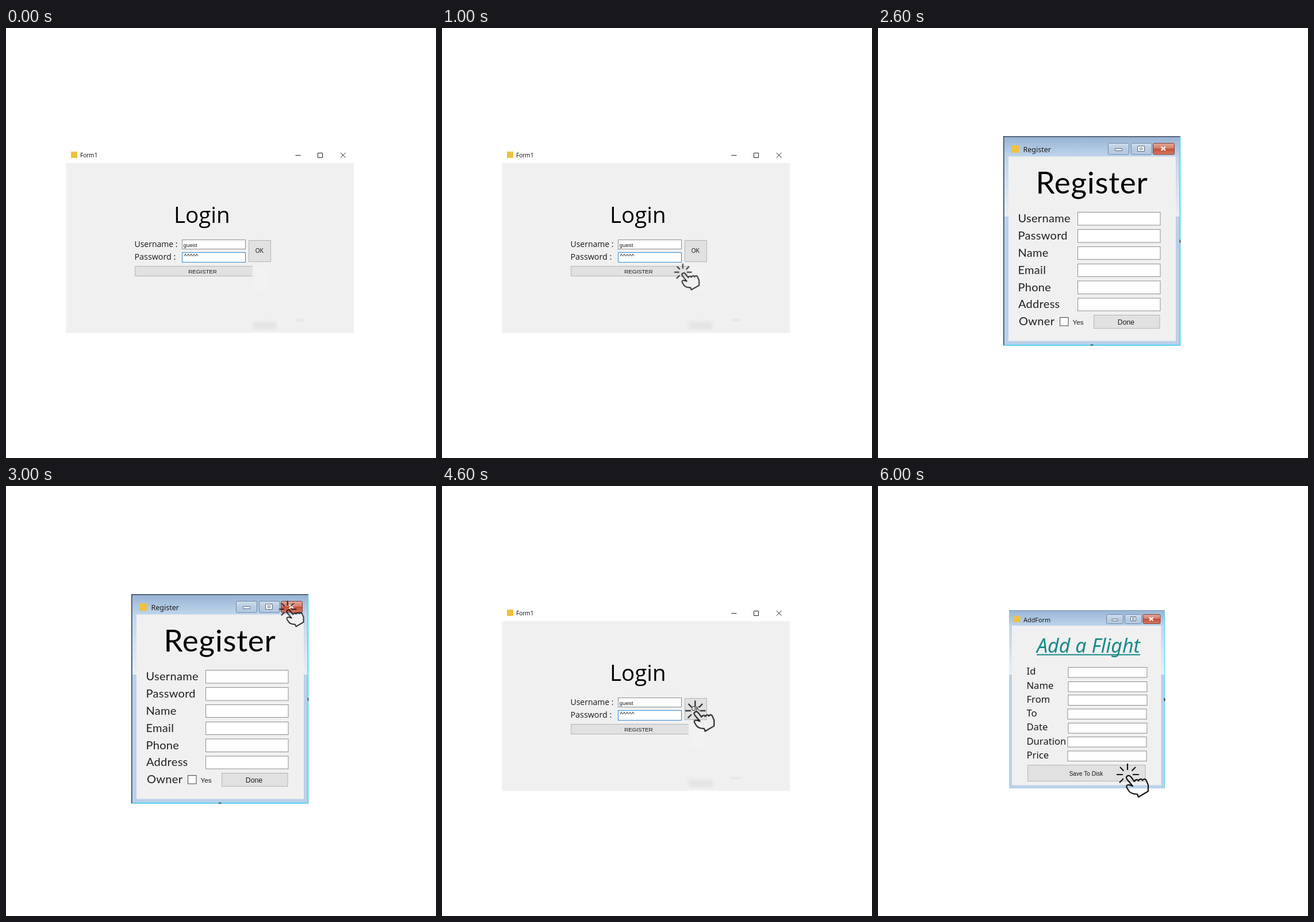
An HTML page that plays this animation: 748 by 748 pixels, repeating every 7000 ms.

```html
<!DOCTYPE html>
<html lang="en">
<head>
<meta charset="utf-8">
<title>Login flow</title>
<style>
html, body { margin: 0; width: 100%; height: 100%; overflow: hidden; background: #fff; }
svg { display: block; width: 100vw; height: 100vh; }

.client { fill: #f0f0f0; }
.field { fill: #fff; stroke: #8a8d91; }
.focus { fill: #fff; stroke: #2f8ad8; }
.btn { fill: #e1e1e1; stroke: #b4b4b4; }
.icon { fill: #f0c040; }
.ctrl { fill: none; stroke: #222; }
.glyph { fill: #fff; stroke: #5b6b80; }
.mid { text-anchor: middle; }
.ui { font-family: "Liberation Sans", Arial, sans-serif; fill: #1a1a1a; }
.noto { font-family: "Noto Sans", sans-serif; fill: #1a1a1a; }
.open { font-family: "Open Sans", sans-serif; fill: #1a1a1a; }
.lato { font-family: Lato, sans-serif; fill: #222; letter-spacing: .015em; }
.title { fill: #000; }

.scene, #hand { visibility: hidden; animation: 7s step-end infinite; }
#login { animation-name: login; }
#register { animation-name: register; }
#list { animation-name: list; }
#add { animation-name: add; }
#hand { animation-name: click; fill: none; stroke: #151313; stroke-width: 2.2; stroke-linejoin: round; }

@keyframes login {
  0% { visibility: visible; }
  28.5714% { visibility: hidden; }
  57.1428% { visibility: visible; }
  71.4285%, 100% { visibility: hidden; }
}
@keyframes register {
  0% { visibility: hidden; }
  28.5714% { visibility: visible; }
  57.1428%, 100% { visibility: hidden; }
}
@keyframes list {
  0% { visibility: hidden; }
  71.4285% { visibility: visible; }
  85.7142%, 100% { visibility: hidden; }
}
@keyframes add {
  0% { visibility: hidden; }
  85.7142%, 100% { visibility: visible; }
}
@keyframes click {
  0% { visibility: hidden; }
  14.2857% { visibility: visible; transform: translate(404px, 410px) scale(.785); }
  28.5714% { visibility: hidden; }
  42.8571% { visibility: visible; transform: translate(475px, 199.5px) scale(.775); }
  57.1428% { visibility: visible; transform: translate(423px, 373.5px) scale(.915); }
  71.4285% { visibility: visible; transform: translate(487px, 526px) scale(.785); }
  85.7142%, 100% { visibility: visible; transform: translate(415px, 483px); }
}
</style>
</head>
<body>
<svg viewBox="0 0 748 748">
  <defs>
    <linearGradient id="bar" x2="0" y2="1">
      <stop offset="0" stop-color="#98b4d4"/><stop offset="1" stop-color="#bfd5ec"/>
    </linearGradient>
    <linearGradient id="side" x2="0" y2="1">
      <stop offset="0" stop-color="#bfd5ec"/><stop offset="1" stop-color="#e6eff8"/>
    </linearGradient>
    <linearGradient id="pane" x2="0" y2="1">
      <stop offset="0" stop-color="#cfdeee"/><stop offset=".5" stop-color="#b9cce1"/><stop offset="1" stop-color="#b3cae3"/>
    </linearGradient>
    <linearGradient id="red" x2="0" y2="1">
      <stop offset="0" stop-color="#e3a999"/><stop offset=".48" stop-color="#d47a66"/>
      <stop offset=".5" stop-color="#c44e37"/><stop offset="1" stop-color="#d67a60"/>
    </linearGradient>
    <filter id="soft" x="-50%" y="-50%" width="200%" height="200%"><feGaussianBlur stdDeviation="3"/></filter>
  </defs>

  <g id="login" class="scene">
    <rect class="icon" x="113" y="215" width="11" height="11"/>
    <text class="noto" x="129" y="225" font-size="10">Form1</text>
    <path class="ctrl" d="M503.5 221.5h9M542.5 217.5h8v8h-8zM582 217l8.5 8.5M590.5 217l-8.5 8.5"/>
    <rect class="client" x="104.5" y="235" width="500.5" height="295.5"/>
    <text class="open title" x="292" y="339" font-size="38.5">Login</text>
    <text class="open" x="223.5" y="381" font-size="14">Username :</text>
    <text class="open" x="223.5" y="403" font-size="14.3">Password :</text>
    <rect class="field" x="306.5" y="368.5" width="110" height="16"/>
    <rect class="focus" x="306.5" y="390.5" width="110" height="17"/>
    <text class="ui" x="308.5" y="380.5" font-size="9.8">guest</text>
    <text class="ui" x="309.5" y="400.5" font-size="10.6">^^^^^</text>
    <rect class="btn" x="422.5" y="369.5" width="38" height="37"/>
    <text class="ui mid" x="441" y="391" font-size="10">OK</text>
    <path class="btn" d="M429 414.5h-204.5v17h204.5"/>
    <text class="ui mid" x="342" y="426.5" font-size="9.7">REGISTER</text>
    <g filter="url(#soft)">
      <rect x="431" y="415" width="26" height="42" fill="#f2f2f2"/>
      <rect x="429" y="511" width="42" height="13" fill="#e4e4e4"/>
      <rect x="426" y="531" width="52" height="3" fill="#fff"/>
    </g>
    <rect x="502" y="505.5" width="18" height="5" rx="2.5" fill="#e8e8e8"/>
  </g>

  <g id="register" class="scene">
    <rect x="218" y="188" width="308" height="364.5" fill="#b9d1ea"/>
    <rect x="220" y="190" width="305" height="34" fill="url(#bar)"/>
    <rect x="220" y="223" width="305" height="105" fill="url(#side)"/>
    <path d="M218 189h308M218.7 188v364" fill="none" stroke="#39424e" stroke-width="1.6"/>
    <path d="M525.3 191v360.7H220" fill="none" stroke="#58d3f1" stroke-width="2"/>
    <path d="M524.5 368.5h2v5h-2zM369.5 550.5h5v2h-5z" fill="#555"/>
    <rect class="icon" x="232" y="204" width="13" height="13"/>
    <text class="noto" x="252.5" y="216" font-size="12.5">Register</text>
    <g fill="url(#pane)" stroke="#7188a4">
      <rect x="400.5" y="200.5" width="36" height="19.5" rx="2"/>
      <rect x="440.5" y="200.5" width="35.5" height="19.5" rx="2"/>
      <rect x="478.5" y="200.5" width="37" height="19.5" rx="2" fill="url(#red)" stroke="#84403a"/>
    </g>
    <path class="glyph" d="M412.5 209.5h12v4h-12zM451.5 205.5h12v9h-12zM455.5 208.5h4v3h-4z"/>
    <path d="M492.5 206.5l7.5 6.5M500 206.5l-7.5 6.5" stroke="#fff" stroke-width="2.2"/>
    <rect class="client" x="227" y="223.5" width="291" height="321"/>
    <text class="lato title" x="274.5" y="288" font-size="53">Register</text>
    <g class="lato" font-size="20">
      <text x="243.5" y="338">Username</text>
      <text x="243.5" y="368">Password</text>
      <text x="243.5" y="398">Name</text>
      <text x="243.5" y="428">Email</text>
      <text x="243.5" y="457.5">Phone</text>
      <text x="244" y="487">Address</text>
      <text x="245" y="517">Owner</text>
    </g>
    <g class="field">
      <rect x="347.5" y="320.5" width="143.5" height="22.5"/>
      <rect x="347.5" y="350.5" width="143.5" height="22.5"/>
      <rect x="347.5" y="380.5" width="143.5" height="22"/>
      <rect x="347.5" y="410.5" width="143.5" height="22"/>
      <rect x="347.5" y="440" width="143.5" height="22.5"/>
      <rect x="347.5" y="470" width="143.5" height="22"/>
      <rect x="316.5" y="503.5" width="14.5" height="14.5" stroke="#444"/>
    </g>
    <text class="ui" x="338.5" y="515.5" font-size="11.7">Yes</text>
    <rect class="btn" x="375.5" y="499.5" width="114.5" height="23"/>
    <text class="ui mid" x="431.5" y="515.5" font-size="12.3">Done</text>
  </g>

  <g id="list" class="scene">
    <rect class="client" x="241" y="195" width="268" height="355.5"/>
    <rect class="field" x="244.5" y="221.5" width="262.5" height="299.5"/>
    <g class="btn">
      <rect x="245.5" y="199.5" width="261" height="17.5"/>
      <rect x="245.5" y="528" width="123.5" height="17.5"/>
      <rect x="376" y="528" width="62" height="17.5"/>
      <rect x="444.5" y="528" width="62" height="17.5"/>
    </g>
    <g class="ui" font-size="9">
      <text class="mid" x="375.5" y="212">Refresh</text>
      <text x="246.5" y="232">listBox1</text>
      <text class="mid" x="306.5" y="540">Reserve Seat</text>
      <text class="mid" x="406" y="540" font-size="8.7">Edit Flight</text>
      <text class="mid" x="475" y="540" font-size="8.7">Add Flight</text>
    </g>
  </g>

  <g id="add" class="scene">
    <rect x="228" y="216" width="271" height="310" fill="#b9d1ea"/>
    <rect x="228" y="216" width="271" height="28" fill="url(#bar)"/>
    <rect x="228" y="243" width="271" height="85" fill="url(#side)"/>
    <path d="M228 216.5h271" stroke="#7d94ae"/>
    <path d="M498.5 218v307.5" stroke="#58d3f1"/>
    <path d="M497.5 369h2v5h-2z" fill="#333"/>
    <rect class="icon" x="236.5" y="226" width="11" height="11"/>
    <text class="noto" x="253" y="236.5" font-size="10.9">AddForm</text>
    <g fill="url(#pane)" stroke="#7188a4">
      <rect x="397.5" y="223.5" width="29" height="16" rx="2"/>
      <rect x="429.5" y="223.5" width="29" height="16" rx="2"/>
      <rect x="461" y="223.5" width="30" height="16" rx="2" fill="url(#red)" stroke="#84403a"/>
    </g>
    <path class="glyph" d="M407 231.5h10v3h-10zM439.5 227.5h9v7h-9zM442.5 229.5h3v3h-3z"/>
    <path d="M472 228.5l6.5 5.5M478.5 228.5l-6.500 5.5" stroke="#fff" stroke-width="2"/>
    <rect class="client" x="233" y="243" width="259.5" height="277.5"/>
    <text class="noto" x="276" y="290" font-size="34" font-style="italic" style="fill:#168a88">Add a Flight</text>
    <path d="M276 293.5h180" stroke="#168a88" stroke-width="1.8"/>
    <g class="noto" font-size="16.6">
      <text x="258.5" y="328">Id</text>
      <text x="258.5" y="353">Name</text>
      <text x="258.5" y="376.5">From</text>
      <text x="258.5" y="401">To</text>
      <text x="258.5" y="425">Date</text>
      <text x="258.5" y="449.5">Duration</text>
      <text x="258.5" y="473.5">Price</text>
    </g>
    <g class="field">
      <rect x="331" y="315.5" width="137" height="17.5"/>
      <rect x="331" y="340.5" width="137" height="17.5"/>
      <rect x="331" y="363.5" width="137" height="18"/>
      <rect x="330" y="388" width="137" height="17.5"/>
      <rect x="331" y="412.5" width="137" height="17.5"/>
      <rect x="330" y="436.5" width="137" height="17.5"/>
      <rect x="330" y="461" width="137" height="17.5"/>
    </g>
    <rect class="btn" x="260.5" y="485.5" width="204.5" height="28"/>
    <text class="ui mid" x="362" y="503.5" font-size="10.1">Save To Disk</text>
  </g>

  <g id="hand">
    <path d="M19 0v11M0 19h11M28 19h11M6 6l6.5 6.5M33 6l-6.5 6.5M5 33l7-7"/>
    <path d="M28 39L18 27C15 22 21 18 25 23L31 31C33 27 37 27 38 30C40 26 44 26 45 29C48 25 51 27 52 30L55 37V48L38 58L36 53C30 53 24 52 21 47L17.5 41C16 36 22 36 28 39z"/>
  </g>
</svg>
</body>
</html>
```
